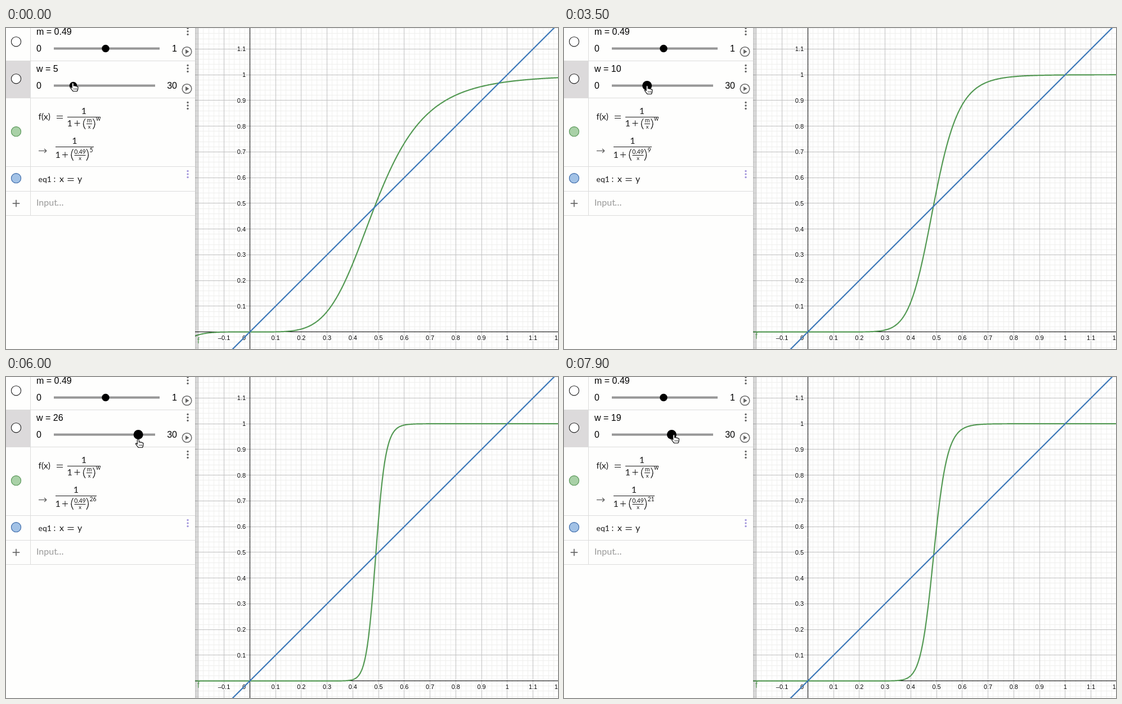
An HTML page with a canvas for the animation above (8000 ms loop, 981 by 571 pixels).

```html
<!DOCTYPE html>
<html lang="en">
<head>
<meta charset="utf-8">
<title>Sigmoid sliders</title>
<style>
html, body { margin: 0; width: 100%; height: 100%; overflow: hidden; background: #fefefd; }
canvas { display: block; }
</style>
</head>
<body>
<canvas id="stage" width="981" height="571"></canvas>
<script>
const W = 981, H = 571, LOOP = 8000, STEP = 100;
const X0 = 433.3, Y0 = 540.65, UNIT = 457.5, PANEL = 336;
const SANS = '"Liberation Sans", Arial, sans-serif';
const MATH = 'Lato, "Open Sans", sans-serif';
const INK = '#1a1a1a', GREY = '#666', GREEN = '#559a55', BLUE = '#3d78b8';
const ctx = document.getElementById('stage').getContext('2d');

// Slider value over time
const drag = [
  [0, 5], [1600, 5], [2500, 7.6], [2700, 8], [3300, 9.4], [3400, 9.8], [3600, 10.3],
  [3700, 11.2], [4400, 19.1], [4500, 19.9], [4800, 21.8], [5400, 25], [5700, 26],
  [6000, 26], [6300, 28], [6500, 29.6], [6600, 29.8], [6700, 28.4], [6900, 28],
  [7300, 23.5], [7400, 23.5], [7700, 20.9], [7800, 19.2], [7900, 18.2]
];

// Pointer offset from the handle, and its height
const pointerDx = [[0, 1.5], [3500, 2], [3700, -1], [5400, -1], [6000, 2], [6600, 1], [6900, 5], [7400, 2], [7700, 5]];
const pointerY = [[1600, 104], [3500, 110], [4800, 118], [6000, 118], [6900, 119], [7300, 116], [7900, 110]];

function track(keys, t) {
  if (t <= keys[0][0]) return keys[0][1];
  for (let i = 1; i < keys.length; i++) {
    const [a, u] = keys[i - 1], [b, v] = keys[i];
    if (t <= b) return u + (v - u) * (t - a) / (b - a);
  }
  return keys[keys.length - 1][1];
}

const valueAt = t => Math.round(track(drag, t));
const handleX = w => 93 + w * 164 / 30;
const px = x => X0 + x * UNIT;
const py = y => Y0 - y * UNIT;
const crisp = v => Math.floor(v) + 0.5;

function text(s, x, y, size, font = SANS, color = INK, align = 'left') {
  ctx.font = size + 'px ' + font;
  ctx.fillStyle = color;
  ctx.textAlign = align;
  ctx.fillText(s, x, y);
}

function math(s, x, y, size = 16, align = 'left') {
  text(s, x, y, size, MATH, INK, align);
}

function line(x1, y1, x2, y2, color, width = 1) {
  ctx.strokeStyle = color;
  ctx.lineWidth = width;
  ctx.beginPath();
  ctx.moveTo(x1, y1);
  ctx.lineTo(x2, y2);
  ctx.stroke();
}

function disc(x, y, r, fill, stroke, width = 1.1) {
  ctx.beginPath();
  ctx.arc(x, y, r, 0, Math.PI * 2);
  if (fill) { ctx.fillStyle = fill; ctx.fill(); }
  if (stroke) { ctx.strokeStyle = stroke; ctx.lineWidth = width; ctx.stroke(); }
}

function gridLines(step, color, keep) {
  for (let i = -15; i < 70; i++) {
    if (!keep(i)) continue;
    const x = crisp(X0 + i * step), y = crisp(Y0 - i * step);
    if (x > PANEL) line(x, 0, x, H, color);
    line(PANEL, y, W, y, color);
  }
}

function axisLabel(s, x, y, align) {
  ctx.font = '11px ' + SANS;
  ctx.textAlign = align;
  ctx.strokeStyle = '#fff';
  ctx.lineWidth = 3;
  ctx.lineJoin = 'round';
  ctx.strokeText(s, x, y);
  text(s, x, y, 11, SANS, '#000', align);
}

function plot(w) {
  const f = x => Math.abs(x) < 1e-6 ? 0 : 1 / (1 + Math.pow(0.49 / x, w));
  ctx.save();
  ctx.beginPath();
  ctx.rect(PANEL, 0, W - PANEL, H);
  ctx.clip();
  ctx.fillStyle = '#fff';
  ctx.fillRect(PANEL, 0, W - PANEL, H);
  gridLines(UNIT / 50, '#efefed', i => i % 5 !== 0);
  gridLines(UNIT / 10, '#c0c0c0', i => i !== 0);
  line(PANEL, crisp(Y0), W, crisp(Y0), '#000');
  line(crisp(X0), 0, crisp(X0), H, '#000');

  for (let i = -1; i <= 12; i++) {
    const s = i < 0 ? '\u20130.1' : String(i / 10);
    if (i) axisLabel(s, px(i / 10), 555, 'center');
    if (i > 0) axisLabel(s, 426, Math.round(py(i / 10) + 4), 'right');
  }
  axisLabel('0', 426, 555, 'right');

  ctx.strokeStyle = GREEN;
  ctx.lineWidth = 2.2;
  ctx.beginPath();
  for (let x = PANEL - 1; x <= W + 1; x++) ctx.lineTo(x, py(f((x - X0) / UNIT)));
  ctx.stroke();
  line(px(-0.1), py(-0.1), px(1.25), py(1.25), BLUE, 2.2);

  const edge = py(f((PANEL - X0) / UNIT)) - Y0;
  text('f', 340, 553 + edge * 1.15, 14, SANS, GREEN);

  const shade = ctx.createLinearGradient(PANEL, 0, PANEL + 7, 0);
  shade.addColorStop(0, 'rgba(0,0,0,.22)');
  shade.addColorStop(1, 'rgba(0,0,0,.05)');
  ctx.fillStyle = shade;
  ctx.fillRect(PANEL, 0, 6, H);
  ctx.restore();
}

function menu(y, color = GREY) {
  for (const d of [-5.5, 0, 5.5]) disc(323, y + d, 1.7, color);
}

function play(y) {
  disc(321.5, y, 8.3, null, GREY, 1.5);
  ctx.fillStyle = GREY;
  ctx.beginPath();
  ctx.moveTo(319, y - 4);
  ctx.lineTo(325.5, y);
  ctx.lineTo(319, y + 4);
  ctx.fill();
}

function slider(label, y, end, max, maxX, x, r) {
  text(label, 54, y - 24, 16, SANS, '#000');
  text('0', 54, y + 6, 16, SANS, '#000');
  text(max, maxX, y + 6, 16, SANS, '#000', 'right');
  line(85, y + 0.5, end, y + 0.5, '#979797', 4);
  disc(x, y + 0.5, r, '#000');
  menu(y - 30);
  play(y + 6);
  disc(18, y - 11.7, 8.6, '#fff', '#222');
}

function paren(x, top, bottom, side) {
  ctx.strokeStyle = INK;
  ctx.lineWidth = 1.2;
  ctx.beginPath();
  ctx.moveTo(x, top);
  ctx.quadraticCurveTo(x - side * 7, (top + bottom) / 2, x, bottom);
  ctx.stroke();
}

function plus(x, y, r, color, width) {
  line(x - r, y, x + r, y, color, width);
  line(x, y - r, x, y + r, color, width);
}

function equals(x, y) {
  line(x, y - 2, x + 11, y - 2, INK);
  line(x, y + 2, x + 11, y + 2, INK);
}

function formulas(power) {
  math('f(x)', 57.5, 163, 15.5);
  equals(90, 158.5);
  math('1', 138.5, 152.5, 16, 'center');
  line(109, 158.5, 168, 158.5, INK);
  math('1', 108.5, 175);
  plus(126.5, 169.5, 5, INK, 1);
  paren(141, 161, 180, 1);
  math('m', 148, 167.5, 10.5, 'center');
  line(143, 170.5, 153, 170.5, INK);
  math('x', 148, 179, 9.5, 'center');
  paren(154.5, 161, 180, -1);
  math('w', 160, 165, 10.5);

  const end = power > 9 ? 161 : 156;
  line(58, 218.5, 72, 218.5, '#555', 1.2);
  line(68, 215, 72, 218.5, '#555', 1.2);
  line(68, 222, 72, 218.5, '#555', 1.2);
  math('1', (88 + end) / 2, 206, 16, 'center');
  line(88, 211.5, end, 211.5, INK);
  math('1', 87.5, 231);
  plus(105, 225.5, 5, INK, 1);
  paren(119.5, 215, 236, 1);
  math('0.49', 131.5, 223.5, 10.5, 'center');
  line(121.5, 226.5, 141.5, 226.5, INK);
  math('x', 131.5, 235, 9.5, 'center');
  paren(143, 215, 236, -1);
  math(String(power), 148.5, 221, 10.5);

  math('eq1', 57.5, 274, 14);
  math(':', 84.5, 274, 15);
  math('x', 95, 274);
  equals(109.5, 269.5);
  math('y', 127, 274);
}

function hand(x, y) {
  ctx.save();
  ctx.translate(x, y);
  ctx.beginPath();
  ctx.moveTo(-3.8, 1.5);
  ctx.lineTo(-3.8, -6);
  ctx.quadraticCurveTo(-2.3, -9, -0.8, -6);
  ctx.lineTo(-0.8, -2);
  ctx.quadraticCurveTo(1, -3.6, 2, -1.6);
  ctx.quadraticCurveTo(4, -2.8, 4.7, -0.8);
  ctx.quadraticCurveTo(7, -1.5, 7, 1);
  ctx.quadraticCurveTo(7, 4.5, 5.3, 7.5);
  ctx.lineTo(-1.8, 7.5);
  ctx.quadraticCurveTo(-4.5, 4.5, -6.8, 1);
  ctx.quadraticCurveTo(-6.3, -1.5, -3.8, 1.5);
  ctx.closePath();
  ctx.fillStyle = '#fff';
  ctx.fill();
  ctx.strokeStyle = '#111';
  ctx.lineWidth = 1.2;
  ctx.lineJoin = 'round';
  ctx.stroke();
  for (const d of [-0.2, 2.3, 4.5]) line(d, 2, d, 5, '#333', 0.9);
  ctx.restore();
}

function panel(t, shown) {
  ctx.fillStyle = '#fefefd';
  ctx.fillRect(0, 0, PANEL, H);
  ctx.fillStyle = '#dcdadb';
  ctx.fillRect(0, 59, 43, 66);
  for (const y of [58.5, 124.5, 246.5, 290.5, 333.5]) line(0, y, PANEL, y, '#dcdcdc');
  line(43.5, 0, 43.5, 334, '#dcdcdc');

  const x = handleX(valueAt(t));
  const r = t < 500 ? 6.8 : t < 1700 ? 7.8 : 8.5;
  slider('m = 0.49', 36, 273, '1', 304, 177, 6.7);
  slider('w = ' + shown, 102, 265, '30', 304, t < 500 ? x - 0.8 : x, r);

  disc(18, 184.2, 8.6, '#a9d1a7', '#579556');
  disc(18, 267.2, 8.6, '#a2c2e6', '#3a69a8');
  menu(138);
  menu(260, '#a497dc');
  formulas(valueAt(t - 200));
  plus(18, 312, 6.3, GREY, 1.7);
  text('Input', 54, 316, 16, MATH, '#999');
  text('\u2026', 90, 316, 16, '"Noto Sans", sans-serif', '#999');

  const y = t < 1500 ? 105 : track(pointerY, t);
  hand(handleX(track(drag, t)) + track(pointerDx, t) - (t < 1500 ? 0.8 : 0), y);
}

function frame(now) {
  const t = Math.floor(now % LOOP / STEP) * STEP;
  const shown = valueAt(t - 100);
  plot(shown);
  panel(t, shown);
  requestAnimationFrame(frame);
}
requestAnimationFrame(frame);
</script>
</body>
</html>
```
